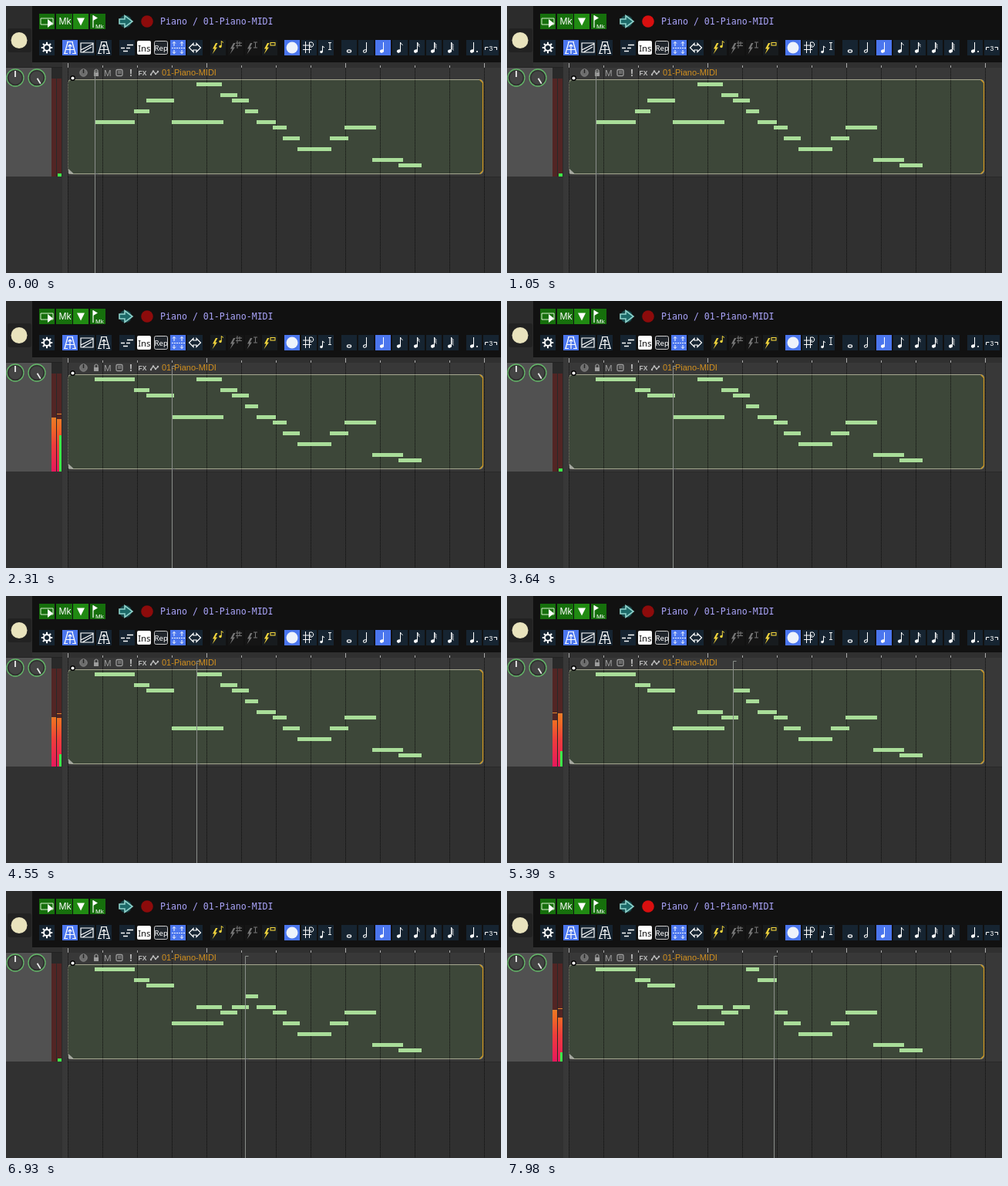
An HTML page that plays this animation: 642 by 346 pixels, repeating every 8 s.

```html
<!DOCTYPE html>
<html lang="en">
<head>
<meta charset="utf-8">
<title>Step input</title>
<style>
html, body { margin: 0; width: 100%; height: 100%; overflow: hidden; background: #303030; }
svg { display: block; width: 642px; height: 346px; }
text { font-family: "Liberation Sans", Arial, sans-serif; }
.mono { font-family: "DejaVu Sans Mono", monospace; }
.ui { font-family: "Noto Sans", sans-serif; }
</style>
</head>
<body>
<svg id="stage" viewBox="0 0 642 346" xmlns="http://www.w3.org/2000/svg">
  <defs>
    <linearGradient id="heat" gradientUnits="userSpaceOnUse" x1="0" y1="145" x2="0" y2="221">
      <stop offset="0" stop-color="#e8842a"/>
      <stop offset=".25" stop-color="#f06a24"/>
      <stop offset=".55" stop-color="#ee3c3c"/>
      <stop offset="1" stop-color="#e8185c"/>
    </linearGradient>
  </defs>
  <g id="panels"></g>
  <g id="arrange"></g>
  <g id="toolbar"></g>
  <g id="notes"></g>
  <g id="meter"></g>
  <path id="cursor" fill="none" stroke="#8a8e8a"/>
</svg>
<script>
const LOOP = 8000, STEP = 70, BLINK = 770;
const byId = id => document.getElementById(id);

function add(parent, tag, attrs, text) {
  const node = document.createElementNS("http://www.w3.org/2000/svg", tag);
  for (const key in attrs) node.setAttribute(key, attrs[key]);
  if (text) node.textContent = text;
  parent.appendChild(node);
  return node;
}
const rect = (p, x, y, width, height, fill, extra) => add(p, "rect", { x, y, width, height, fill, ...extra });
const path = (p, d, extra) => add(p, "path", { d, ...extra });
const line = (p, d, stroke = "#fff", width = 1.2) => path(p, d, { fill: "none", stroke, "stroke-width": width });
const circle = (p, cx, cy, r, fill, extra) => add(p, "circle", { cx, cy, r, fill, ...extra });
const label = (p, x, y, size, fill, text, extra) => add(p, "text", { x, y, "font-size": size, fill, ...extra }, text);

function drawPanels() {
  const g = byId("panels");
  rect(g, 0, 0, 642, 346, "#303030");
  rect(g, 0, 0, 34, 80, "#2c2c2c");
  rect(g, 2, 29, 31, 31, "#222", { rx: 3 });
  circle(g, 17, 44.5, 10.5, "#e9e3bd");
  rect(g, 0, 80, 59, 141, "#515151");
  rect(g, 59, 80, 14, 141, "#292929");
  rect(g, 0, 221, 73, 125, "#313131");
  rect(g, 73, 73, 7, 273, "#383838");
  rect(g, 0, 79, 73, 1, "#222");
  [[12, 0], [40, 148]].forEach(([x, angle]) => {
    circle(g, x, 93, 11, "#303030", { stroke: "#65b96a", "stroke-width": 1.3 });
    circle(g, x, 93, 8.5, "#444");
    path(g, `M${x} 92V84`, { stroke: "#eee", "stroke-width": 1.8, transform: `rotate(${angle} ${x} 93)` });
  });
}

function drawArrange() {
  const g = byId("arrange");
  rect(g, 80, 80, 562, 141, "#383838");
  rect(g, 80, 73, 562, 7, "#303030");
  rect(g, 80.5, 95.5, 538, 122, "#3d4739", { rx: 4, stroke: "#a5a790" });
  line(g, "M614.5 95.5L618.5 99.5V213.5L614.5 217.5", "#d2981f", 1.2);
  path(g, "M81 211L88 217.5H81Z", { fill: "#a5a8a0" });
  for (let i = 0; i < 13; i++) {
    const x = 80.5 + 45 * i;
    path(g, `M${x} 80V346`, { stroke: "#0c0c0c", "stroke-dasharray": "1 1" });
    line(g, `M${x} ${i % 4 ? 77 : 74}V80`, "#aaa", 1);
  }
  rect(g, 80, 221, 562, 1, "#292929");
  circle(g, 86.5, 93.5, 2.8, "#fff", { stroke: "#000", "stroke-width": 1.4 });

  const grey = "#9c9c9c";
  circle(g, 100.5, 86.5, 4.7, "#6d6d6d", { stroke: "#8a8a8a" });
  line(g, "M100.5 82V87", "#252525", 1.5);
  rect(g, 114, 86, 6, 5, grey);
  line(g, "M115 86V83.5Q117 80.5 119 83.5V86", grey, 1.2);
  label(g, 127, 90.5, 11.5, grey, "M");
  rect(g, 143, 82.5, 8, 8, "none", { rx: 1.5, stroke: grey, "stroke-width": 1.3 });
  line(g, "M145 85H149.5M145 87H149.5", grey, 1);
  label(g, 160, 91, 12, "#ccc", "!", { "font-weight": 700 });
  label(g, 171.5, 90, 8.5, "#bbb", "FX", { "font-weight": 700 });
  line(g, "M187.5 89L191 84.5L194 88L197.5 85", "#bbb", 1.3);
  [[188, 89], [191, 84.5], [194, 88], [197, 85]].forEach(([x, y]) => circle(g, x, y, 1.2, "#bbb"));
  label(g, 202, 90, 11, "#d2901f", "01-Piano-MIDI");
}

const NAVY = "#162431", BLUE = "#4b76ee";
const button = (g, x, fill = NAVY) => rect(g, x, 44, 20, 20, fill);

function musicNote(g, x, flags, open) {
  add(g, "ellipse", {
    cx: x + 8.5, cy: 58.5, rx: 2.2, ry: 1.5, fill: open ? "none" : "#fff", stroke: "#fff",
    transform: `rotate(-18 ${x + 8.5} 58.5)`
  });
  line(g, `M${x + 10.5} 58V47`, "#fff", 1);
  for (let i = 0; i < flags; i++) line(g, `M${x + 10.5} ${47 + i * 2.2}q.3 1.8 3 3.6`, "#fff", 1);
}

function bolt(g, x, colour) {
  path(g, `M${x + 7} 48L${x + 3} 55.5H${x + 5.5}L${x + 2.5} 62.5L${x + 9} 53.5H${x + 6.5}L${x + 9.5} 48Z`, { fill: colour });
}

function metronome(g, x) {
  line(g, `M${x + 7} 47L${x + 3} 61.5M${x + 13} 47L${x + 17} 61.5M${x + 6} 46.5H${x + 14}`);
  line(g, `M${x + 2} 61.5H${x + 7}M${x + 13} 61.5H${x + 18}M${x + 5} 56.5H${x + 15}`);
  line(g, `M${x + 10} 62V50M${x + 7.5} 52.5L${x + 10} 50L${x + 12.5} 52.5`);
}

function drawToolbar() {
  const g = byId("toolbar");
  rect(g, 34, 0, 608, 73, "#111");
  [43, 65, 87, 109].forEach(x => rect(g, x, 10, x === 65 ? 21 : 20, 20, x === 87 ? "#208a12" : "#166f0c"));
  line(g, "M45 24V16H61V24Z", "#d8f0d0", 1);
  path(g, "M54 17V28L61 22.5Z", { fill: "#fff" });
  label(g, 68.5, 24, 12, "#fff", "Mk");
  path(g, "M92 15.5H102L97 25.5Z", { fill: "#fff" });
  line(g, "M113 12V28", "#fff", 1.2);
  path(g, "M113 12L119 15.5L113 19Z", { fill: "#fff" });
  label(g, 116, 28.5, 8, "#fff", "Mk");
  circle(g, 155, 20, 8, "#17494b");
  path(g, "M147 17H154V12.5L164 20L154 27.5V23H147Z", { fill: "#1d6a69", stroke: "#8fd2cb", "stroke-width": 1.6 });
  circle(g, 183, 20, 7.8, "#8d0b0b", { id: "record" });
  label(g, 200, 24, 11.6, "#aaa4fa", "Piano / 01-Piano-MIDI", { class: "mono" });

  button(g, 43);
  circle(g, 53, 54, 4, "none", { stroke: "#fff", "stroke-width": 2 });
  for (let a = 0; a < 360; a += 45)
    path(g, "M53 49.5V46.8", { stroke: "#fff", "stroke-width": 2, transform: `rotate(${a} 53 54)` });

  button(g, 73, BLUE); metronome(g, 73);
  button(g, 95);
  line(g, "M97 48H113V60H97ZM97 57L113 49M99 60L111 53");
  button(g, 117); metronome(g, 117);
  button(g, 147);
  line(g, "M157 50.5H165M149 54.5H154M156 54.5H161M152 58.5H158", "#fff", 1.4);
  rect(g, 170, 45, 18, 18, "#fff", { rx: 2 });
  label(g, 171.2, 58.5, 11.3, "#111", "Ins", { class: "ui" });
  rect(g, 192.5, 45.5, 17, 17, "#20252b", { rx: 2, stroke: "#ccc" });
  label(g, 192.6, 58, 9.6, "#fff", "Rep", { class: "ui" });
  button(g, 213, BLUE);
  path(g, "M215 54.5H232", { stroke: "#fff", "stroke-dasharray": "2 1" });
  [218, 228].forEach(x => line(g, `M${x} 46.5V52M${x - 2} 48.5L${x} 46.5L${x + 2} 48.5M${x} 57V61.5M${x - 2} 59.5L${x} 61.5L${x + 2} 59.5`, "#fff", 1));
  button(g, 235);
  line(g, "M243 48.5L237.5 54L243 59.5V57H247V59.5L252.5 54L247 48.5V51H243Z");

  [265, 288, 310, 332].forEach((x, i) => {
    const bright = i === 0 || i === 3, colour = bright ? "#f0d43c" : "#777";
    button(g, x, bright ? "#171b1e" : "#151515");
    bolt(g, x, colour);
    if (i === 0) {
      circle(g, 278, 52.5, 1.7, colour);
      line(g, "M279.3 52V45.5L282 47.5", colour, 1);
    } else if (i === 1) line(g, "M300 45V55M298 48H306M298 51.5H306M303 46V52", colour, 1);
    else if (i === 2) line(g, "M321 47H326M323.5 47V54M321 54H326", colour, 1);
    else rect(g, 343, 47.5, 6, 3.5, "none", { stroke: colour, "stroke-width": 1.1 });
  });

  button(g, 361, BLUE);
  circle(g, 371, 54, 7.5, "#eef2fb");
  button(g, 383);
  line(g, "M388.5 46V61M385 51H396M385 56.5H396M393.5 61V47H397Q400.5 50 397 53H393.5", "#fff", 1);
  button(g, 405);
  circle(g, 409, 59.5, 1.7, "#fff");
  line(g, "M410.5 59.5V52L413 54M418 47.5H422M420 47.5V56.5M418 56.5H422", "#fff", 1);

  button(g, 435);
  add(g, "ellipse", { cx: 445, cy: 58.5, rx: 2.6, ry: 1.6, fill: "none", stroke: "#fff", "stroke-width": 1.2 });
  for (let i = 0; i < 6; i++) {
    const x = 457 + 22 * i;
    button(g, x, i === 1 ? BLUE : NAVY);
    musicNote(g, x, Math.max(0, i - 1), i === 0);
  }
  button(g, 597);
  musicNote(g, 596, 0);
  circle(g, 611, 59, 1, "#fff");
  button(g, 619);
  line(g, "M621.5 57V53.5H625.5M632.5 53.5H636.5V57", "#fff", 1);
  label(g, 626.5, 57.5, 8.5, "#fff", "3");
}

// x, width, y before and after being replayed, time of the key press
const NOTES = [
  [115, 52, 150, 101, 1190], [166, 20, 136, 115, 1610], [182, 36, 122, 122, 2150],
  [215, 67, 150, 171, 4060], [247, 33, 101, 150, 4620], [278, 22, 115, 157, 4970],
  [293, 22, 122, 150, 5670], [310, 17, 136, 101, 7140], [325, 25, 150, 115, 7420],
  [346, 18, 157], [359, 22, 171], [378, 44, 185], [420, 24, 171],
  [439, 41, 157], [475, 40, 199], [509, 30, 206]
].map(([x, width, from, to = from, at = Infinity]) => ({ x, width, from, to, at }));

drawPanels();
drawArrange();
drawToolbar();

NOTES.forEach(n => { n.node = rect(byId("notes"), n.x, n.from - 2, n.width, 5, "#a9dd99"); });

const meter = byId("meter");
const channels = [[59, 1], [66, -1]].map(([x, sign]) => {
  rect(meter, x, 94, 6, 127, "#522524");
  return {
    sign,
    bar: rect(meter, x, 221, 6, 0, "url(#heat)"),
    peak: rect(meter, x, 149, 6, 1, "#e0842c")
  };
});
const midi = rect(meter, 67, 217, 5, 4, "#3df04a");

function setBar(bar, height) {
  bar.setAttribute("y", 221 - height);
  bar.setAttribute("height", height);
}

// Slow fall with the channels swaying against each other, then a drop to silence
function level(age, sign) {
  if (age > 1200) return 0;
  const sway = sign * 5 * Math.cos((age - 570) / 54);
  const base = age < 600 ? 72 - age / 55 : 61 * (1200 - age) / 600;
  return Math.max(0, base + sway);
}

function render(time) {
  const t = Math.floor(time / STEP) * STEP;
  const played = NOTES.filter(n => n.at <= t);
  const age = played.length ? t - played[played.length - 1].at : Infinity;

  NOTES.forEach(n => n.node.setAttribute("y", (n.at <= t ? n.to : n.from) - 2));
  const x = NOTES[played.length].x + .5;
  byId("cursor").setAttribute("d", `M${x + 4} 84.5H${x}V346M${x} 217.5H${x + 4}`);

  channels.forEach(({ sign, bar, peak }) => {
    const height = Math.round(level(age, sign));
    const held = Math.max(...[0, 1, 2].map(i => level(Math.max(0, age - i * STEP), sign)));
    setBar(bar, height);
    peak.setAttribute("y", 221 - Math.round(held));
    peak.setAttribute("visibility", height ? "visible" : "hidden");
  });

  const pulse = Math.round(80 * Math.exp(-age / 300));
  setBar(midi, Math.max(4, pulse));
  midi.setAttribute("x", pulse > 4 ? 69 : 67);
  midi.setAttribute("width", pulse > 4 ? 3 : 5);

  const phase = t % BLINK;
  byId("record").setAttribute("fill", phase >= 105 && phase < 490 ? "#d80f0f" : "#8d0b0b");
}

const start = performance.now();
function tick() {
  render((performance.now() - start) % LOOP);
  requestAnimationFrame(tick);
}
tick();
</script>
</body>
</html>
```
